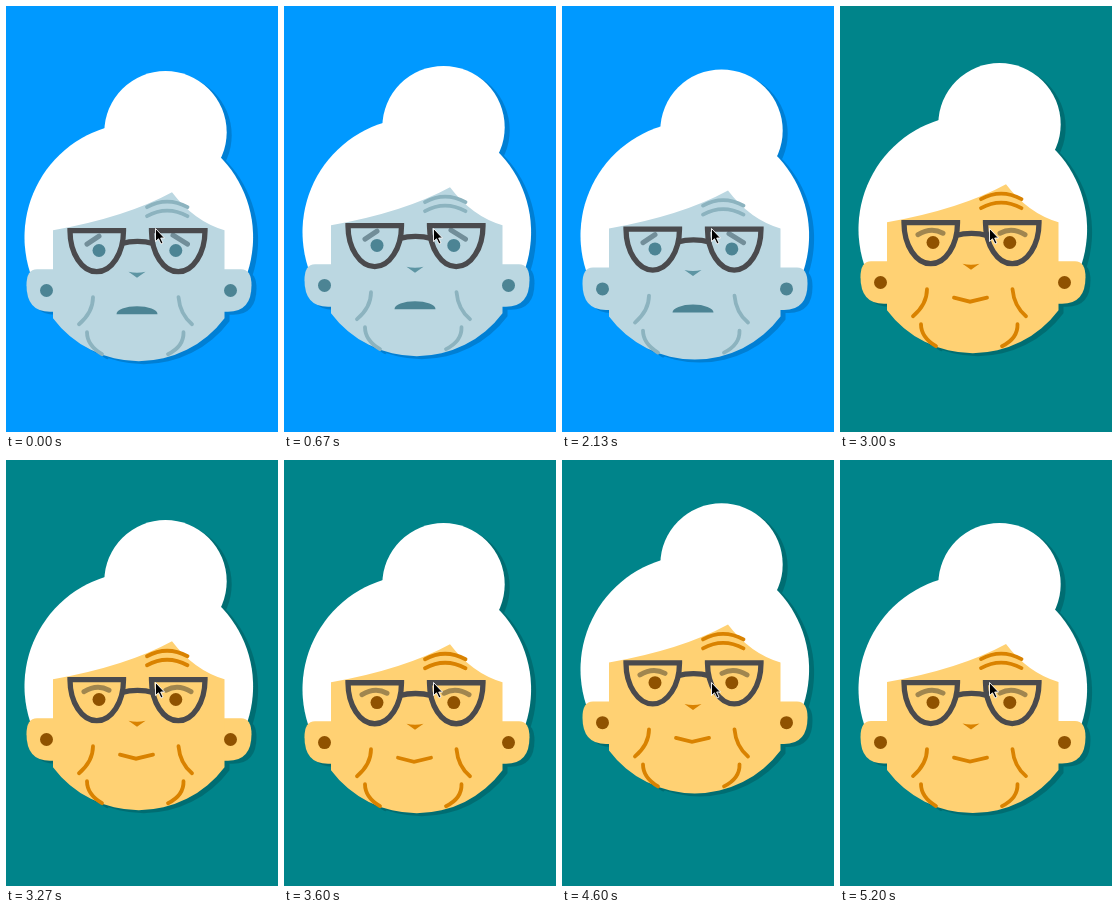
Animation, 272 px wide and 426 px high, one loop 5270 ms. Source, as an HTML page:

```html
<!DOCTYPE html>
<html lang="en">
<head>
<meta charset="utf-8">
<title>Grandma's mood</title>
<style>
  html, body { margin: 0; width: 100%; height: 100%; overflow: hidden; background: #09f; }
  svg { display: block; width: 272px; height: 426px; }

  .sad {
    --bg: #0099ff; --skin: #bbd7e1; --dark: #4c8494; --nose: #5d95a3;
    --wrinkle: #8cb3bf; --brow: #728e99;
  }
  .calm {
    --bg: #00848a; --skin: #ffd173; --dark: #8f5200; --nose: #d98200;
    --wrinkle: #d98200; --brow: #a0864f;
  }
  .sad .if-calm, .calm .if-sad { display: none; }

  .bg { fill: var(--bg); }
  .skin { fill: var(--skin); }
  .dark { fill: var(--dark); }
  .nose { fill: var(--nose); }
  .hair { fill: #fff; }
  .line { fill: none; stroke-linecap: round; }
  .wrinkles { stroke: var(--wrinkle); stroke-width: 3.8; }
  .brows { stroke: var(--brow); stroke-width: 5; }
  .glasses { fill: none; stroke: #4a4a4d; stroke-width: 5.3; }
  #head { filter: drop-shadow(5px 3px .6px rgba(0, 0, 0, .17)); }
</style>
</head>
<body>
<svg id="stage" class="sad" viewBox="0 0 272 426">
  <rect class="bg" width="272" height="426"/>
  <g id="head">
    <circle class="hair" cx="159.5" cy="124" r="61.2"/>
    <path class="hair" d="M24 264A114.300 114.300 0 1 1 241.600 264Z"/>

    <g class="skin">
      <path id="ear" d="M48 261H31Q20.500 261 20.500 277Q20.500 303.500 44 303.500H48Z"/>
      <use href="#ear" transform="matrix(-1 0 0 1 266 0)"/>
      <path d="M47 222Q120 209 166 184Q188 213 218.500 222V310A107 107 0 0 1 47 310Z"/>
    </g>
    <g class="dark">
      <circle id="dot" cx="40.5" cy="282.3" r="6.5"/>
      <use href="#dot" x="184"/>
      <use href="#dot" x="52.5" y="-40"/>
      <use href="#dot" x="129.300" y="-40"/>
    </g>

    <g class="line wrinkles">
      <path id="frown" d="M141 199Q161 188 181.500 199"/>
      <use href="#frown" y="9"/>
      <path d="M87 289Q87 304 73 316M172.500 289Q174 306 186 316"/>
      <path d="M81 324Q81 337 96 346M177.500 324Q178 338 162 346"/>
      <path class="if-calm" d="M114 297.500L130 301.500L147 297.500"/>
    </g>
    <path class="nose" d="M122.500 263.500Q131 265.500 139.500 263.500L131 269.500Z"/>
    <path class="dark if-sad" d="M110.500 306A20.500 8 0 0 1 151.500 306Z"/>

    <g class="line brows">
      <path class="if-sad" d="M81 236L93 228M167 227L181.500 236"/>
      <path class="if-calm" d="M78 234.500Q91 226.500 103 233M160 233Q172 226.500 185 234.500"/>
    </g>

    <g class="glasses">
      <path id="lens" d="M64 222.500H117.500A26.750 41 0 0 1 64 222.500Z"/>
      <use href="#lens" transform="matrix(-1 0 0 1 263 0)"/>
      <path d="M115 235.500Q131.500 231 148 235.500"/>
    </g>
  </g>

  <path fill="#000" stroke="#fff" stroke-width=".9" d="M149.500 222.500V235.500L152.500 232.800L155 238L157 237L154.700 232H158.500Z"/>
</svg>
<script>
  const LOOP = 5270, CHEER_UP = 2470, HOPS = [145, 2477, 4130];
  const stage = document.getElementById('stage');
  const head = document.getElementById('head');

  // Rise with ease-out, hang, then drop with a steep ease-in.
  function arc(p, start, top, fall, land, height) {
    if (p <= start || p >= land) return 0;
    if (p < top) return height * (1 - (1 - (p - start) / (top - start)) ** 3);
    if (p < fall) return height;
    return height * (1 - ((p - fall) / (land - fall)) ** 6);
  }

  // One hop with two smaller rebounds, p from 0 to 1.
  const hop = p =>
    arc(p, .2, .4, .43, .53, 19.8) +
    arc(p, .53, .7, .7, .8, 9.9) +
    arc(p, .8, .9, .9, 1, 2.6);

  function draw(now) {
    const t = now % LOOP;
    const lift = HOPS.reduce((sum, start) => sum + hop((t - start) / 1000), 0);
    const sag = 2.2 * Math.exp(-t / 1600);
    head.setAttribute('transform', `translate(0 ${sag - lift})`);
    stage.setAttribute('class', t < CHEER_UP ? 'sad' : 'calm');
    requestAnimationFrame(draw);
  }

  draw(0);
</script>
</body>
</html>
```
